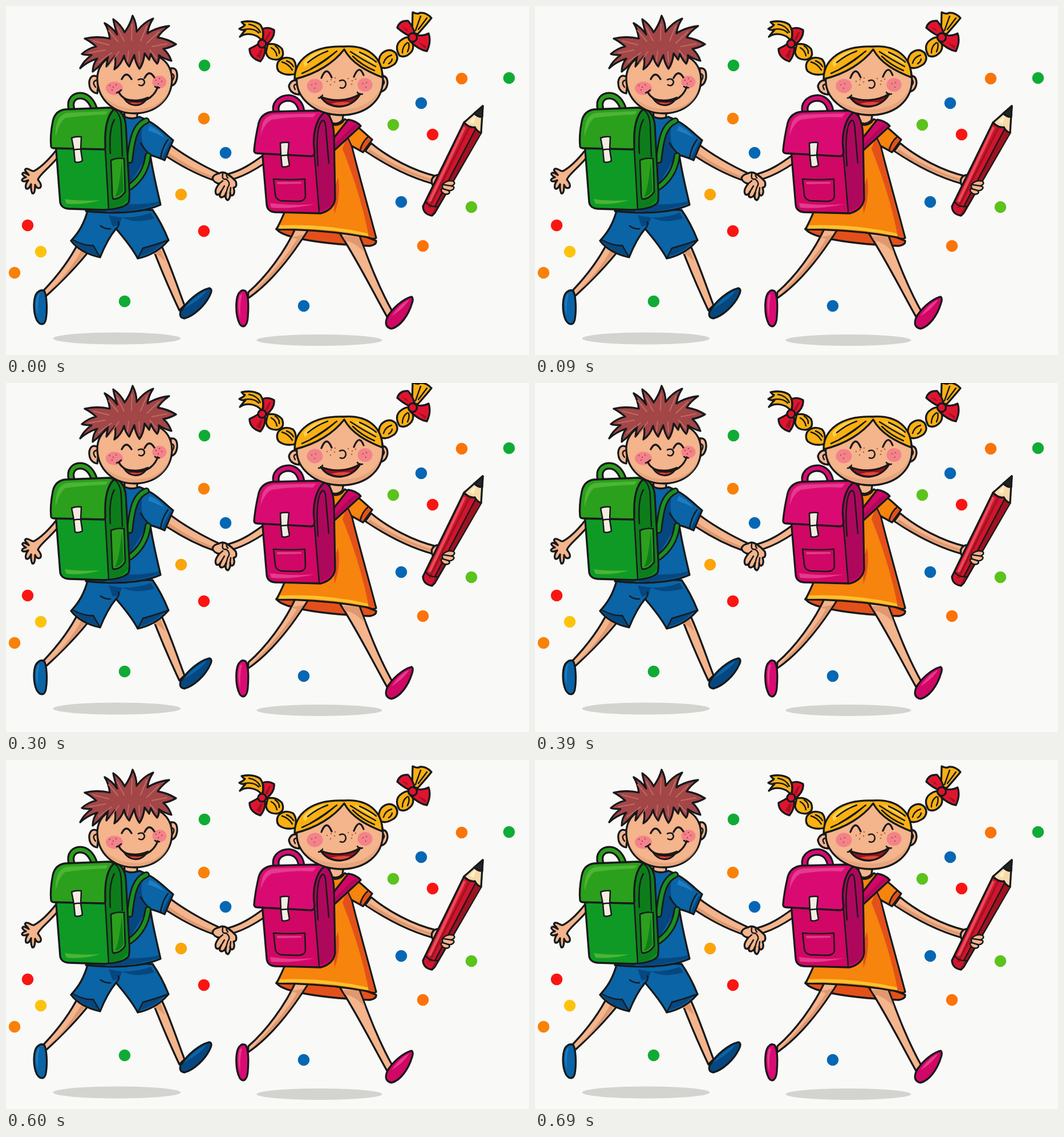
Write an HTML page that moves like this. It is 917 px wide and 611 px high and loops after 750 ms.

```html
<!DOCTYPE html>
<html lang="en">
<head>
<meta charset="utf-8">
<title>Two schoolchildren skipping</title>
<style>
  html, body { margin: 0; width: 100%; height: 100%; overflow: hidden; background: #f9f9f7 }
  svg { display: block; width: 917px; height: 611px }
  .ink { stroke: #17191a; stroke-width: 3.3; stroke-linejoin: round; stroke-linecap: round; fill: none }
  .thin { stroke-width: 2.5 }
  .flat { stroke: none }
  .skin { fill: #f4b48c }
  .tan { fill: #e0986f }
  .blush { fill: #f3828b }
  .blue { fill: #0a64a6 }
  .navy { fill: #064780 }
  .sky { fill: #1f7cc0 }
  .leaf { fill: #0f9a26 }
  .lime { fill: #2ba01d }
  .moss { fill: #0d7d1c }
  .mint { fill: #4cb533 }
  .pink { fill: #d00764 }
  .rose { fill: #d90b72 }
  .plum { fill: #ad085c }
  .candy { fill: #e63a8e }
  .gold { fill: #fbb012 }
  .orange { fill: #f6840d }
  .rust { fill: #e4501a }
  .red { fill: #e0142f }
  .wine { fill: #a01220 }
  .cream { fill: #f3ece2 }
</style>
</head>
<body>
<svg viewBox="0 0 917 611">
<g id="scene">
  <g fill="#d3d3cf">
    <ellipse cx="194.5" cy="582" rx="112" ry="10.5"/>
    <ellipse cx="549.5" cy="585" rx="110" ry="10"/>
  </g>
  <g id="dots"></g>

  <!-- boy: arms and legs -->
  <g class="ink">
    <path class="skin" d="M90 250C76 268 64 281 49 289C44 290 41 284 35 285Q31 287 37 292L40 296Q33 291 30 292Q26 295 35 300Q28 302 28 305Q30 309 39 305Q33 313 35 319Q39 323 44 312Q43 322 46 328Q51 330 51 313Q54 321 60 318Q64 314 56 304C58 296 72 287 90 266Z"/>
    <path class="skin" d="M128 412C112 445 88 475 65 499L69 509C92 488 122 459 147 427Z"/>
    <path class="skin" d="M255 418C270 457 287 497 304 533L313 524C300 490 287 450 271 416Z"/>
    <path class="tan flat" d="M142 428C120 456 98 483 71 504C98 478 118 454 132 428ZM258 426L269 421C273 430 276 438 279 447C271 439 265 434 260 434Z"/>
    <path class="blue" d="M57 500C47 506 47 535 54 550C60 560 68 559 70 548C73 530 71 505 67 499Q61 496 57 500Z"/>
    <path class="sky flat" d="M56 505C51 515 52 532 56 541C55 528 56 515 59 504Z"/>
    <path class="navy" d="M306 535C318 515 340 498 356 494Q362 495 359 503C350 525 328 543 313 547Q303 546 306 535Z"/>
    <path class="blue flat" d="M312 530C323 516 338 504 352 498C343 511 326 522 312 530Z"/>
    <path class="blue" d="M144 355C137 382 127 397 114 411Q130 432 165 440C171 425 182 403 193 390C205 404 222 425 231 442Q264 435 285 410C277 390 268 373 257 357Z"/>
    <path class="navy flat" d="M118 412Q140 420 152 420L163 437Q135 431 118 412ZM233 438L240 424Q262 418 281 409Q262 432 233 438ZM180 366Q215 376 254 362L260 372Q225 382 204 370L198 384L187 386Z"/>
    <path class="thin" d="M118 410Q140 421 153 419L165 440M231 442L240 424Q265 417 285 410M193 390Q200 383 197 378M166 385Q174 391 183 390"/>
    <path class="skin" d="M287 242C310 260 345 280 374 293L364 305C335 295 303 278 275 259Z"/>
    <path class="tan flat" d="M280 260C305 277 335 292 364 303L367 300C337 289 310 274 284 256Z"/>
  </g>

  <!-- boy: shirt and schoolbag -->
  <g class="ink">
    <path class="blue" d="M206 190Q220 199 234 194C260 203 277 222 293 235L278 270Q270 266 253 261C258 295 266 325 271 348Q225 368 140 359Z"/>
    <path class="navy flat" d="M212 300L219 232Q228 212 240 208Q232 240 250 258L217 312ZM274 265L287 238L291 236L278 267ZM175 361L215 347Q245 348 268 342L269 346Q230 360 175 361Z"/>
    <path class="sky flat" d="M252 210Q267 216 278 230Q263 223 249 218Z"/>
    <path class="thin" d="M284 234Q274 247 271 266M236 240Q243 252 253 261"/>
    <path class="skin" d="M207 180L208 194Q220 199 230 195V180Z"/>
    <g data-band="12 6.5 #1b901f">
      <path d="M246 201C226 209 221 232 217 270"/>
      <path d="M249 262C246 287 235 304 217 317"/>
    </g>
    <g data-band="13 6.5 #2b9c1d"><path d="M115 181C110 164 121 157 130 157C142 157 150 167 154 178"/></g>
    <path class="leaf" d="M87 240L95 344Q97 354 110 355L172 357Q206 355 215 344Q217 337 216 320L210 208Q207 181 185 179L100 182Z"/>
    <path class="moss flat" d="M174 250C173 220 178 190 190 182Q206 187 208 210L214 338Q205 352 182 354Z"/>
    <path class="mint flat" d="M103 338Q130 342 165 340Q135 349 106 346Z"/>
    <path class="lime" d="M104 181Q86 183 82 202Q77 227 79 246Q80 249 84 249L171 251Q175 251 174 243C173 218 176 194 189 181Q186 178 180 178Z"/>
    <path class="mint flat" d="M107 187Q93 190 89 206Q86 218 87 229Q93 204 104 196Q140 191 175 190L179 184Z"/>
    <path class="thin" d="M174 251L180 354M189 181Q201 187 202 210L204 263M183 258Q180 216 190 199"/>
    <path class="lime thin" d="M184 270Q195 265 207 267L209 325Q201 338 188 338Q186 336 186 320Z"/>
    <path class="moss flat" d="M203 271L206 323Q199 334 191 334Q199 320 203 271Z"/>
    <path class="cream thin" d="M115 231Q122 228 132 229L131 251L134 271Q128 275 121 273L119 252Z"/>
    <path class="thin" d="M119 252Q125 250 131 251"/>
  </g>

  <!-- boy: head -->
  <g class="ink">
    <path class="skin" d="M163 125Q149 117 146 132Q145 150 160 153ZM289 109Q301 107 300 125Q298 139 288 140Z"/>
    <path class="thin" d="M158 130Q150 133 157 142M292 119Q297 122 292 130"/>
    <path class="skin" d="M160 128C160 98 184 80 226 80C268 80 291 98 291 130C290 165 260 188 226 188C187 188 161 163 160 128Z"/>
    <path class="tan flat" opacity=".5" d="M170 155C188 178 225 186 255 176C276 168 285 153 288 140C284 172 256 186 226 186C199 186 179 174 170 155Z"/>
    <ellipse class="blush flat" cx="190" cy="144" rx="15" ry="11.5"/>
    <ellipse class="blush flat" cx="269" cy="133" rx="12.5" ry="11"/>
    <path fill="#a34648" d="M130 109Q136 96 150 86Q138 86 133 84Q144 74 158 71Q148 62 138 57Q160 52 182 57Q180 41 173 30Q186 37 195 50Q190 34 188 23Q201 32 208 46Q218 32 222 17Q229 30 229 45Q242 28 258 22Q250 34 248 48Q265 37 286 35Q272 45 266 55Q284 58 298 67Q288 73 276 75Q286 84 290 96Q278 93 268 86Q269 95 265 101Q258 94 254 84L251 94L243 83Q241 101 234 110Q227 100 225 86L216 106Q209 98 207 87Q202 103 190 111Q193 99 191 88L176 106L179 87Q168 103 152 115Q152 102 160 92Q142 98 130 109Z"/>
    <path stroke="#bd6a62" stroke-width="2" d="M153 61L180 68M180 43L196 62M195 38L207 61M221 32L220 60M247 35L236 61M268 45L247 65M282 66L256 71M146 82L174 77M162 99L185 82M183 100L198 80M213 97L215 79M234 98L233 80M264 91L252 77"/>
    <path d="M203 128Q211 112 220 128M243 126Q251 110 260 125"/>
    <path class="thin" d="M232 129Q242 125 243 134Q240 142 233 138"/>
    <path class="wine thin" d="M207 162Q229 169 249 160Q240 174 227 174Q214 173 207 162Z"/>
    <path class="flat" fill="#e0453a" d="M217 170Q228 166 239 169Q228 174 217 170Z"/>
    <path d="M198 151C208 172 253 177 266 142"/>
    <path class="thin" d="M194 152Q198 151 202 147M261 141Q265 144 269 143"/>
    <path class="thin" stroke="#b3484d" d="M182 139h.1M188 142h.1M193 138h.1M186 147h.1M263 130h.1M269 127h.1M273 132h.1M267 136h.1"/>
  </g>

  <!-- girl: arms and legs -->
  <g class="ink">
    <path class="skin" d="M454 259C430 277 412 288 390 294Q396 304 402 302C420 296 436 287 454 275Z"/>
    <path class="skin" d="M374 293Q363 295 362 302Q365 310 374 311Q364 323 369 330Q374 332 377 325Q372 334 378 335Q383 335 386 327Q383 338 389 340Q394 336 393 327Q394 334 398 331Q402 327 399 318Q406 317 403 307Q396 299 388 294Q380 289 374 293Z"/>
    <path class="thin" d="M380 294Q378 305 386 303Q394 309 390 316M374 311L380 306M377 325L383 315M386 327L389 317M393 326L394 318M388 294Q385 297 389 301"/>
    <path class="skin" d="M640 240C670 265 715 289 755 298L748 311C708 300 670 281 630 254Z"/>
    <path class="tan flat" d="M634 255C670 279 712 297 748 308L750 304C712 293 674 275 638 251Z"/>
    <path class="rust" d="M474 390Q480 399 505 405C555 417 610 419 638 420Q650 418 649 411Q560 375 474 390Z"/>
    <path class="skin" d="M510 384C490 430 455 475 425 501L424 512C463 486 500 440 535 384Z"/>
    <path class="skin" d="M580 390C612 437 643 500 668 544L677 534C655 495 638 452 616 392Z"/>
    <path class="tan flat" d="M500 405L522 400C498 440 463 481 428 507C462 473 495 435 510 408ZM590 403L617 402C622 413 627 424 630 433C618 420 606 412 595 411Z"/>
    <path class="rose" d="M411 500C402 506 401 540 410 557C416 565 423 560 424 545C426 520 424 505 420 499Q414 496 411 500Z"/>
    <path class="candy flat" d="M410 506C406 517 407 535 411 546C410 530 411 517 414 505Z"/>
    <path class="pink" d="M668 546C676 530 696 513 711 509Q715 511 712 520C705 543 691 561 676 565Q662 562 668 546Z"/>
    <path class="candy flat" d="M676 543C685 529 697 518 707 514C699 527 687 536 676 543Z"/>
  </g>

  <!-- girl: dress, pencil and schoolbag -->
  <g class="ink">
    <path class="orange" d="M566 205Q584 214 594 198C613 206 626 220 642 234L626 256L606 245C620 300 637 360 649 406Q646 409 635 405C580 395 530 391 474 391C486 370 492 350 500 335Z"/>
    <path class="flat" fill="#fcc22f" d="M480 384Q560 381 634 398L636 403Q560 387 478 390Z"/>
    <path class="rust flat" d="M598 228L605 246C618 300 634 360 647 405L636 403Q622 330 590 250ZM618 250L631 230L640 234L626 253ZM574 325L582 300Q588 330 576 364Z"/>
    <path class="thin" d="M635 229Q624 238 621 253M606 245L600 232"/>
    <path class="skin" d="M567 186L568 203Q580 210 590 200L592 186Z"/>
    <path class="pink" d="M600 199Q614 201 622 210L571 257L570 237Z"/>
    <path class="plum flat" d="M618 209L574 251V244L609 209Z"/>

    <path class="skin" d="M755 296Q744 300 747 311Q750 321 757 321L772 296Z"/>
    <path fill="#d0152f" d="M803 204L731 351Q732 365 747 367L752 362L833 222Q826 220 822 212Q813 214 803 204Z"/>
    <path class="wine flat" d="M746 365L823 218L832 223L751 361ZM740 353L811 212L814 213L744 354Z"/>
    <path class="flat" fill="#ea4a58" d="M740 342L802 211L806 213L745 343Z"/>
    <path class="thin" d="M736 343Q743 353 757 351M752 351L823 216"/>
    <path fill="#f7dba8" d="M803 204L836 175L833 222Q826 220 822 212Q813 214 803 204Z"/>
    <path class="flat" fill="#fff0cf" d="M813 202L824 191L820 206Z"/>
    <path fill="#242527" d="M821 188L836 175L835 194Q828 195 821 188Z"/>
    <path class="skin thin" d="M768 310Q775 304 785 307Q789 312 781 315Q788 316 784 321Q780 324 776 323Q780 327 775 329Q768 331 764 325Q761 321 766 319Q763 314 768 310Z"/>
    <path class="thin" d="M768 313L781 315M766 320L776 323"/>

    <g data-band="13 6.5 #d90b72"><path d="M474 187C469 167 486 161 496 161C508 162 516 171 518 184"/></g>
    <path class="pink" d="M448 240L457 347Q458 360 472 361L552 363Q574 357 577 338L575 225Q573 187 553 184L470 186Z"/>
    <path class="plum flat" d="M541 262C536 230 544 197 556 187Q571 190 573 225L575 336Q571 355 549 359Z"/>
    <path class="candy flat" d="M463 345Q500 350 542 347Q500 356 465 353Z"/>
    <path class="rose" d="M468 185Q448 187 443 205Q437 231 435 253Q435 258 441 258L535 263Q541 263 541 255C536 227 544 196 559 186Q556 183 546 183Z"/>
    <path class="candy flat" d="M471 190Q453 192 449 209Q447 218 446 228Q453 205 466 199Q500 193 538 195L544 188Z"/>
    <path class="thin" d="M541 262L549 360M547 280Q542 213 554 201Q560 197 561 217L566 275"/>
    <path class="pink thin" d="M469 303Q495 305 524 303L525 334Q523 342 512 342L482 341Q472 338 472 329Z"/>
    <path class="candy flat" d="M475 308L518 308V311L476 312Z"/>
    <path class="cream thin" d="M481 240Q487 238 496 239L494 261L497 279Q491 283 484 281L482 262Z"/>
    <path class="thin" d="M482 262L494 261"/>
  </g>

  <!-- girl: plaits, bows and head -->
  <g class="ink">
    <path class="gold" d="M447 59C440 50 423 45 410 54Q416 46 420 42Q413 43 409 40Q417 36 419 33Q416 32 413 28Q435 24 446 33Q453 43 450 57Z"/>
    <path class="gold" d="M459 67Q474 64 484 75Q490 91 475 94Q457 94 456 80ZM477 98Q487 86 503 93Q511 101 507 119Q489 123 478 114Q473 107 477 98Z"/>
    <path class="gold" d="M712 47L713 11Q721 15 726 12Q737 11 746 21Q739 30 722 49ZM708 55Q718 70 711 80Q701 92 690 87Q681 72 690 62Q700 53 708 55ZM683 82Q690 93 681 102Q665 113 655 106Q651 92 659 83Q672 72 683 82Z"/>
    <path class="thin" d="M418 41Q434 38 443 47M426 32Q440 34 446 46M465 73Q473 77 475 87M472 70Q480 75 479 83M484 98Q495 101 502 112M492 96Q500 99 504 106M718 43L727 18M723 41L738 21M695 82Q695 70 704 64M704 80Q708 72 706 65M662 100Q665 89 676 86M671 101Q676 98 677 93"/>
    <path class="red" d="M449 62Q453 50 450 40Q460 36 470 42Q472 55 456 68ZM446 64Q438 70 427 75Q427 91 446 97Q456 85 454 70ZM709 53Q697 48 686 38Q690 25 705 26Q714 36 717 50ZM717 50Q730 54 741 48Q746 62 738 79Q724 77 709 62Z"/>
    <path class="wine flat" d="M454 58L461 46L465 45L458 61ZM439 88L446 76L450 77L446 92ZM705 45L693 36L703 40ZM722 63L737 70L735 75Z"/>
    <circle class="red" cx="449" cy="66" r="7"/>
    <circle class="red" cx="713" cy="55" r="7.5"/>

    <path class="skin" d="M513 131Q500 127 496 140Q498 154 514 155ZM658 122Q669 122 669 135Q667 149 656 150Z"/>
    <path class="thin" d="M509 137Q502 138 507 146M661 129Q666 133 660 140"/>
    <path class="skin" d="M510 125C513 95 547 73 590 73C634 74 661 96 661 130C660 167 630 191 587 191C540 190 507 160 510 125Z"/>
    <path class="tan flat" opacity=".5" d="M522 158C545 181 585 186 617 177C641 169 654 153 658 140C652 173 622 189 587 189C558 188 534 176 522 158Z"/>
    <ellipse class="blush flat" cx="541.5" cy="140" rx="14" ry="12.5"/>
    <ellipse class="blush flat" cx="629.5" cy="138" rx="13" ry="12"/>
    <path class="gold" d="M506 128C506 93 538 69 592 71C635 68 660 90 660 125C632 114 606 100 593 76C575 99 545 119 506 128Z"/>
    <path class="flat" fill="#ffcf45" d="M521 99Q536 80 562 77Q542 88 524 107ZM610 79Q637 83 649 102Q631 94 610 79Z"/>
    <path class="thin" d="M519 118Q550 105 575 83M533 111Q557 97 580 79M529 99Q546 85 564 79M608 88Q624 104 646 113M604 80Q625 94 648 106M620 81Q638 89 649 98"/>
    <path d="M553 126Q562 103 571 125M610 124Q619 101 627 121"/>
    <path class="thin" d="M585 131Q595 127 596 137Q594 146 586 143"/>
    <path class="wine" d="M552 159C574 168 600 167 621 154C606 181 568 184 552 159Z"/>
    <path class="flat" fill="#e4453a" d="M570 171Q587 166 604 169Q588 178 570 171Z"/>
    <path class="thin" d="M548 161Q553 161 555 156M616 151Q619 156 625 154"/>
    <path class="thin" stroke="#a8613f" d="M563 132h.1M570 129h.1M576 133h.1M569 138h.1M577 126h.1M600 127h.1M607 131h.1M613 128h.1M606 137h.1M536 138h.1M543 136h.1M541 144h.1M626 136h.1M632 134h.1M631 142h.1"/>
  </g>
</g>
</svg>
<script>
const scene = document.getElementById('scene');

const confetti = {
  '#0fab35': [[348, 104], [208, 517], [882, 126]],
  '#f98108': [[347, 197], [15, 467]],
  '#fa7409': [[731, 420], [799, 127]],
  '#fba50b': [[307, 330]],
  '#fdc30c': [[61, 430]],
  '#0567b4': [[385, 257], [522, 525], [693, 343], [728, 170]],
  '#f91512': [[347, 394], [38, 384], [748, 225]],
  '#5cc21c': [[816, 352], [679, 208]]
};
document.getElementById('dots').innerHTML = Object.entries(confetti).map(([color, spots]) =>
  spots.map(([x, y]) => `<circle cx="${x}" cy="${y}" r="10.3" fill="${color}"/>`).join('')).join('');

// Straps and handles: a coloured line over a wider black one.
for (const group of document.querySelectorAll('[data-band]')) {
  const [outer, inner, color] = group.dataset.band.split(' ');
  for (const path of [...group.children]) {
    const fill = path.cloneNode();
    path.style.strokeWidth = outer;
    fill.style.cssText = `stroke:${color};stroke-width:${inner}`;
    group.append(fill);
  }
}

// The whole picture hops up and down in 6 px steps.
const STEP = 150, STEPS = 5, RISE = 6;
const start = performance.now();
function draw() {
  const step = Math.floor((performance.now() - start) / STEP) % STEPS;
  const lift = RISE * (2 - Math.abs(step - 2));
  scene.setAttribute('transform', `translate(0 ${-lift})`);
  requestAnimationFrame(draw);
}
draw();
</script>
</body>
</html>
```
